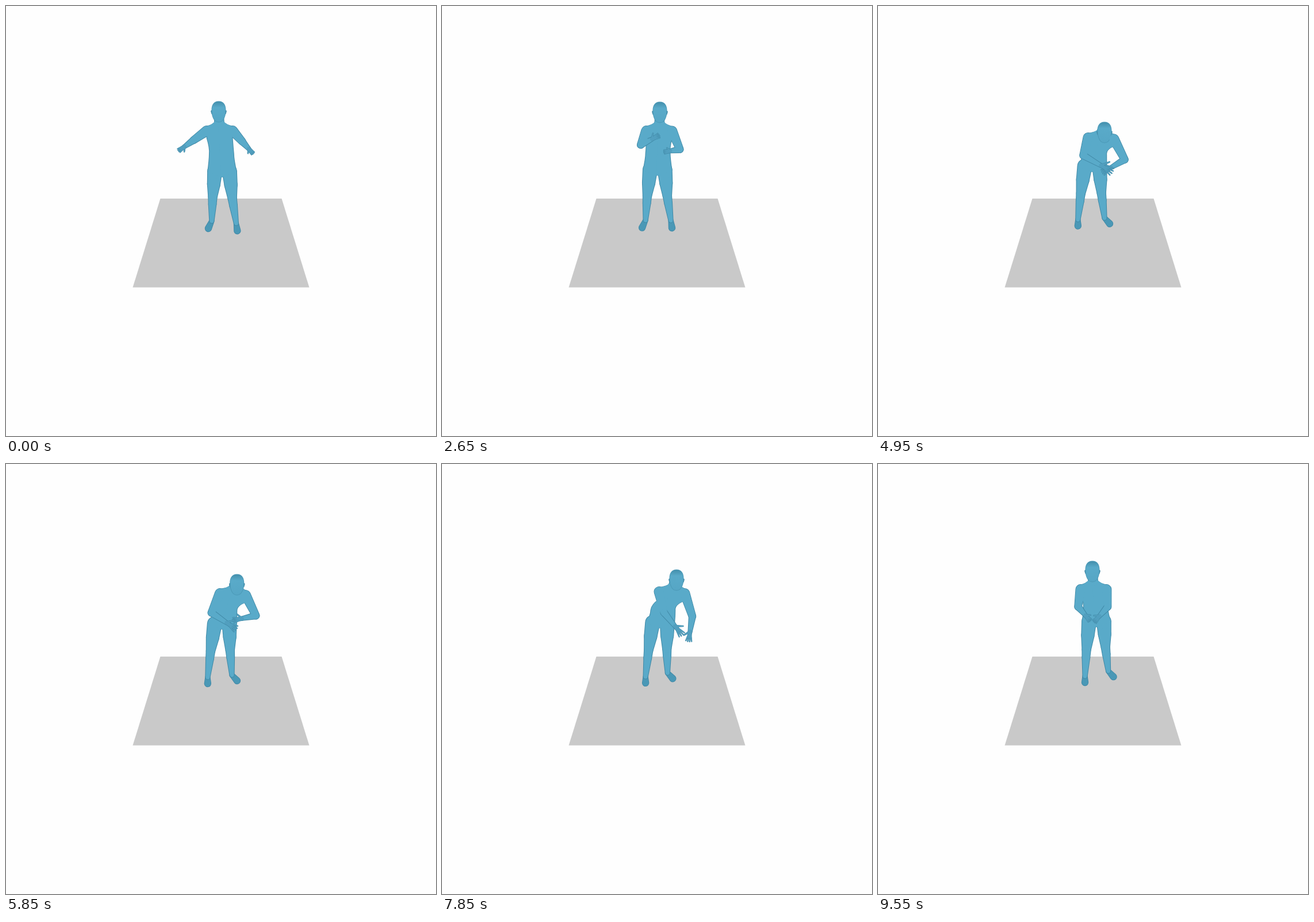
These frames come from a looping animation (748x748 px, 9.6 s). An HTML page with a canvas:

```html
<!DOCTYPE html>
<html lang="en">
<head>
<meta charset="utf-8">
<title>Figure on a floor</title>
<style>
  html, body { margin: 0; width: 100%; height: 100%; overflow: hidden; background: #fefefe; }
  canvas { display: block; }
</style>
</head>
<body>
<canvas width="748" height="748"></canvas>
<script>
const ctx = document.querySelector('canvas').getContext('2d');
const LOOP = 9600, STEP = 50;
const LIGHT = '#59aac9', EDGE = '#4089a6', SHADE = '#4a98b6', HAND = '#529fbf';
const SIDES = [-1, 1];

// The head, the two fingertips and how far the elbows stick out; all else follows
const key = (time, head, left, right, flare) => ({ time, head, left, right, flare });
const talk = [[379, 185], [378, 225], [386, 254], 20];
const keys = [
  key(0, [370, 184], [300, 252], [430, 257], 0),
  key(1450, ...talk),
  key(3050, ...talk),
  key(3750, [392, 197], [415, 274], [393, 264], 26),
  key(4950, [394, 220], [408, 289], [390, 290], 28),
  key(6650, [404, 207], [399, 287], [396, 267], 28),
  key(7850, [408, 202], [418, 298], [429, 309], 10),
  key(8900, [372, 178], [369, 266], [376, 268], 15),
  key(9550, [373, 187], [369, 273], [376, 275], 12)
];

const lerp = (a, b, k) => a + (b - a) * k;
const mix = (a, b, k) => [lerp(a[0], b[0], k), lerp(a[1], b[1], k)];
const add = (p, x, y) => [p[0] + x, p[1] + y];
const clamp = x => Math.max(0, Math.min(1, x));
const easeOut = u => 1 - (1 - u) ** 2;

function legAt(side, crotch, u, step, dip, lean) {
  const ankle = side < 0
    ? [357 + 2 * u - 8 * dip - 4 * lean, 374 - 5 * u]
    : [399 - 6 * lean, 378 - 18 * u];
  const toe = side < 0
    ? add(ankle, -6 + 6 * step, 13 - 2 * step)
    : add(ankle, 2 + 7 * step, 13 - 3 * step);
  const hip = add(crotch, side * 12.8, -10);
  const knee = add(mix(hip, ankle, .5), -1, 1);
  return { hip, knee, ankle, toe };
}

function armAt(side, chest, tip, flare, lean) {
  const shoulder = add(chest, side * 22.5, 1 + side * Math.max(0, lean) * 1.5);
  const reach = Math.hypot(tip[0] - shoulder[0], tip[1] - shoulder[1]);
  // The closer the hand, the lower the elbow hangs
  const drop = Math.max(3, (78 - reach) / 2) * flare / 26;
  const elbow = add(mix(shoulder, tip, .46), side * flare, drop);
  return { side, shoulder, elbow, tip, wrist: mix(elbow, tip, .6) };
}

function poseAt(t) {
  const next = Math.max(1, keys.findIndex(k => k.time >= t));
  const a = keys[next - 1], b = keys[next];
  const k = easeOut((t - a.time) / (b.time - a.time));
  const head = mix(a.head, b.head, k), flare = lerp(a.flare, b.flare, k);

  // Slow drift away from the viewer, one step to the side and a sway back
  const u = t / LOOP;
  const step = easeOut(clamp((t - 3050) / 700));
  const dip = Math.exp(-(((u - .45) / .17) ** 2));
  const crotch = [376 + 4 * u - 6.5 * dip, 298 - 4 * step - 10 * u];
  const lean = (head[0] - crotch[0]) / 26;
  const chest = [lerp(crotch[0], head[0], .72), 216 + (head[1] - 184) * .37];
  return {
    head, crotch, chest,
    legs: SIDES.map(s => legAt(s, crotch, u, step, dip, lean)),
    arms: SIDES.map(s => armAt(s, chest, s < 0 ? mix(a.left, b.left, k) : mix(a.right, b.right, k), flare, lean))
  };
}

// Tapered limb between two round ends
function limb(a, b, ra, rb, color, grow) {
  ra += grow; rb += grow;
  const dx = b[0] - a[0], dy = b[1] - a[1], d = Math.hypot(dx, dy) || 1;
  const dir = Math.atan2(dy, dx), w = Math.acos(Math.max(-1, Math.min(1, (ra - rb) / d)));
  ctx.fillStyle = color;
  ctx.beginPath();
  ctx.arc(...a, ra, dir + w, dir - w + 2 * Math.PI);
  ctx.arc(...b, rb, dir - w, dir + w);
  ctx.fill();
}

function drawTorso({ head, crotch, chest, arms }, color, grow) {
  const waist = [lerp(crotch[0], chest[0], .25), lerp(crotch[1], chest[1], .5)];
  const neck = add(chest, (head[0] - chest[0]) * .4, -13);
  ctx.fillStyle = color;
  for (const { side, shoulder } of arms) {
    const out = w => side * (w + grow);
    ctx.beginPath();
    ctx.moveTo(...add(neck, -side * 2, -2));
    ctx.lineTo(...add(neck, side * 8, -2));
    ctx.quadraticCurveTo(...add(neck, side * 11, 3), ...add(shoulder, side * 2, -7.5 - grow));
    ctx.lineTo(...add(shoulder, out(0), 13));
    ctx.quadraticCurveTo(...add(waist, out(20.5), -10), ...add(waist, out(21.5), 0));
    ctx.quadraticCurveTo(...add(waist, out(21.5), 10), ...add(crotch, out(25.5), -9));
    ctx.lineTo(...crotch);
    ctx.lineTo(...add(crotch, -side * 2, -4));
    ctx.fill();
  }
  limb(head, neck, 8, 8.5, color, grow);
}

function drawLeg({ hip, knee, ankle }, color, grow) {
  const thigh = mix(hip, knee, .5), calf = mix(knee, ankle, .3);
  limb(hip, thigh, 12.7, 11.2, color, grow);
  limb(thigh, knee, 11.2, 7.8, color, grow);
  limb(knee, calf, 7.8, 7, color, grow);
  limb(calf, ankle, 7, 4.2, color, grow);
}

function drawFoot({ ankle, toe }) {
  limb(ankle, toe, 4.4, 6, EDGE, .2);
  limb(ankle, toe, 4.4, 6, SHADE, -.7);
}

function drawUpperArm({ shoulder, elbow }, color, grow) {
  limb(shoulder, elbow, 8.6, 6.4, color, grow);
}

function drawHand({ side, wrist, tip }, color, grow) {
  const len = Math.hypot(tip[0] - wrist[0], tip[1] - wrist[1]);
  const dir = Math.atan2(tip[1] - wrist[1], tip[0] - wrist[0]);
  const reach = (from, angle, d) => add(from, Math.cos(dir + angle) * d, Math.sin(dir + angle) * d);
  const palm = reach(wrist, 0, len * .35);
  limb(wrist, palm, 3.6, 3.4, color, grow);
  for (let i = 0; i < 4; i++) {
    const spread = (i - 1.5) * .3;
    limb(reach(palm, spread * 3, 2.2), reach(palm, spread, len * .65), 1.4, .9, color, grow * .7);
  }
  limb(wrist, reach(wrist, side * .9, len * .7), 2, 1, color, grow * .7);
}

function drawForeArm(arm) {
  limb(arm.elbow, arm.wrist, 6.2, 3.7, EDGE, .4);
  drawHand(arm, EDGE, .4);
  drawUpperArm(arm, LIGHT, -.6);
  limb(arm.elbow, arm.wrist, 6.2, 3.7, LIGHT, -.6);
  drawHand(arm, HAND, -.4);
}

function headShape([x, y], grow, fill) {
  const w = 12.3 + grow, h = 18.3 + grow;
  ctx.fillStyle = fill;
  ctx.beginPath();
  for (const s of SIDES) {
    ctx.moveTo(x, y - h);
    ctx.bezierCurveTo(x + s * w * .75, y - h, x + s * w, y - h * .6, x + s * w, y - 3);
    ctx.bezierCurveTo(x + s * w, y + h * .55, x + s * w * .6, y + h, x, y + h);
  }
  ctx.fill();
}

function drawHead(head) {
  const [x, y] = head;
  for (const s of SIDES) limb([x + s * 12, y - 1], [x + s * 11.4, y + 3], 1.8, 1.4, EDGE, 0);
  const glow = ctx.createLinearGradient(0, y - 18, 0, y + 18);
  glow.addColorStop(0, '#438eab');
  glow.addColorStop(.3, LIGHT);
  glow.addColorStop(1, '#56a6c5');
  headShape(head, .2, SHADE);
  headShape(head, -.7, glow);
}

function drawFloor() {
  ctx.fillStyle = '#c9c9c9';
  ctx.beginPath();
  ctx.moveTo(268.5, 335);
  ctx.lineTo(479.5, 335);
  ctx.lineTo(527.5, 489.5);
  ctx.lineTo(220.5, 489.5);
  ctx.fill();
}

function draw(t) {
  const pose = poseAt(t);
  ctx.fillStyle = '#fefefe';
  ctx.fillRect(0, 0, 748, 748);
  drawFloor();
  pose.legs.forEach(drawFoot);
  for (const [color, grow] of [[EDGE, .4], [LIGHT, -.6]]) {
    pose.legs.forEach(leg => drawLeg(leg, color, grow));
    pose.arms.forEach(arm => drawUpperArm(arm, color, grow));
    drawTorso(pose, color, grow);
  }
  drawHead(pose.head);
  drawForeArm(pose.arms[1]);
  drawForeArm(pose.arms[0]);
}

function tick() {
  draw(Math.floor(performance.now() % LOOP / STEP) * STEP);
  requestAnimationFrame(tick);
}
tick();
</script>
</body>
</html>
```
